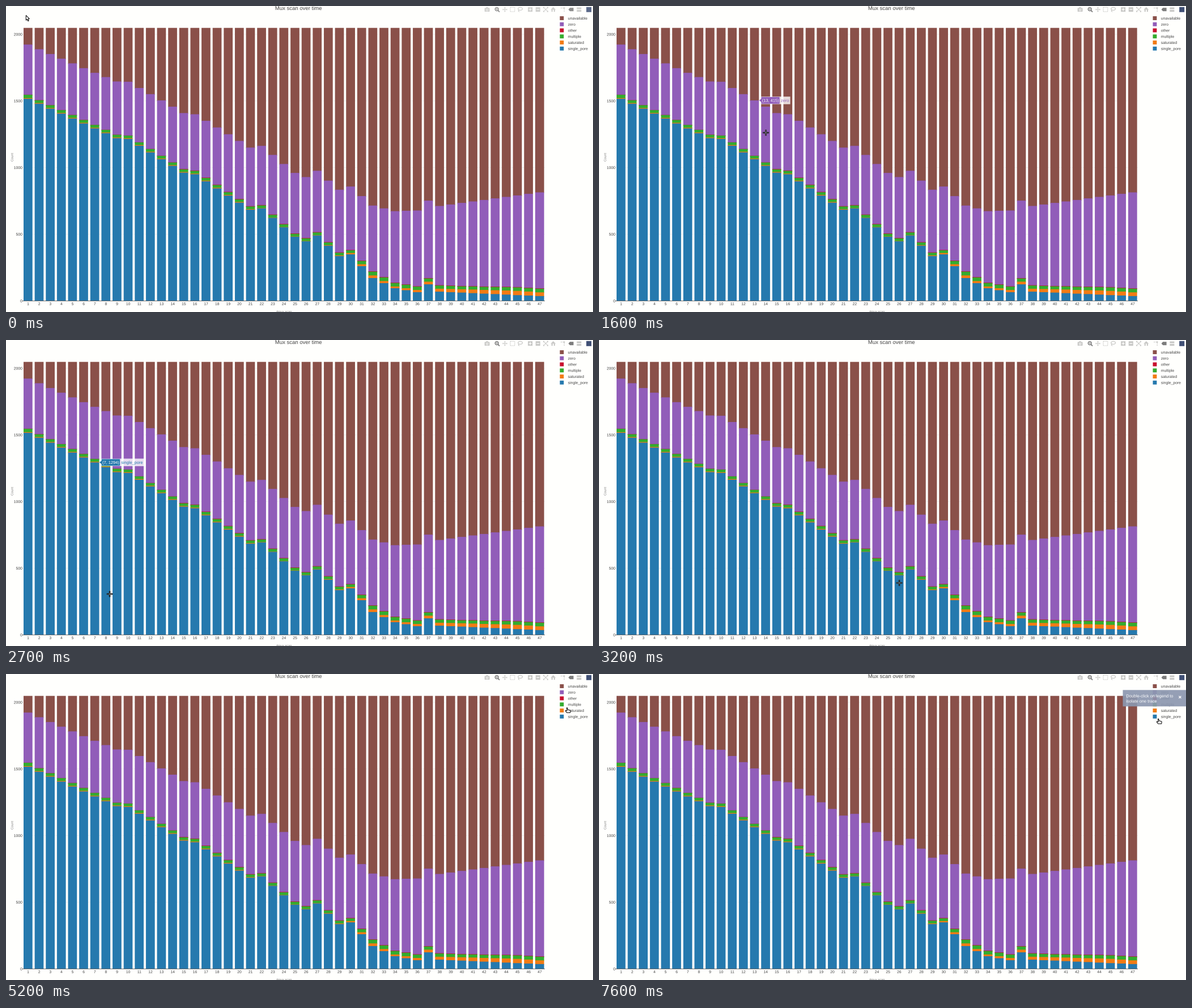
Animation, 1036 px wide and 541 px high, one loop 8 s. Source, as a matplotlib script:

```python
import numpy as np
import matplotlib.pyplot as plt
from matplotlib.animation import FuncAnimation
from matplotlib.collections import PolyCollection
from matplotlib.patches import Circle, Ellipse, PathPatch, Polygon, Rectangle
from matplotlib.path import Path
from matplotlib.textpath import TextPath

W, H, DPI = 1036, 541, 100
STEP, LOOP = 100, 8000
PX = 72 / DPI
INK, FAINT, ACTIVE, PAPER = "#444444", "#c8c8c6", "#7c7c7c", "#fffffd"
plt.rcParams["path.snap"] = False

NAMES = ["single_pore", "saturated", "multiple", "other", "zero", "unavailable"]
COLORS = ["#2579ae", "#f27b14", "#33ac2e", "#c8102e", "#915db9", "#8a5049"]
SINGLE, SATURATED, ZERO, UNAVAILABLE = 0, 1, 4, 5
TOTAL, N = 2048, 47
scan = np.arange(1, N + 1)


def trend(*points):
    """Counts per scan along straight lines between (scan, count) points."""
    return np.interp(scan, *zip(*points)).round()


single = trend((1, 1516), (6, 1331), (9, 1221), (10, 1215), (15, 962),
               (16, 950), (21, 684), (22, 694), (25, 481), (26, 447),
               (27, 491), (29, 336), (30, 349), (32, 171), (34, 95),
               (36, 65), (37, 124), (38, 69), (47, 36))
saturated = trend((1, 5), (20, 5), (22, 2), (27, 2), (29, 5), (32, 20),
                  (34, 13), (39, 24), (45, 32), (47, 28))
multiple = trend((1, 25), (2, 21), (13, 20), (30, 20), (32, 28), (40, 22),
                 (47, 27))
other = np.where(scan > 14, 3, 1)
rest = trend((1, 407), (7, 417), (13, 441), (28, 488), (30, 509), (36, 613),
             (47, 778))
zero = rest - saturated - multiple - other
counts = np.array([single, saturated, multiple, other, zero,
                   TOTAL - single - rest])

# Plot geometry in pixels
X1, PITCH, HALF = 38.85, 19.63, 7.85
BASE, TALLEST = 521.3, 482.6
center = X1 + PITCH * (scan - 1)

fig = plt.figure(figsize=(W / DPI, H / DPI), dpi=DPI, facecolor=PAPER)
ax = fig.add_axes([0, 0, 1, 1])
ax.set(xlim=(0, W), ylim=(H, 0))
ax.axis("off")


def patch(p, color, z=3, **kw):
    p.set(facecolor=color, edgecolor="none", zorder=z)
    p.set(**kw)
    return ax.add_patch(p)


def rect(x, y, w, h, color, z=3, **kw):
    return patch(Rectangle((x, y), w, h), color, z, **kw)


def line(xs, ys, color=FAINT, width=1.0, z=3, **kw):
    return ax.plot(xs, ys, color=color, lw=width * PX, zorder=z,
                   solid_capstyle="butt", **kw)[0]


def glyphs(s, size):
    return TextPath((0, 0), s, size=size, prop={"family": "Liberation Sans"})


def text_path(x, y, s, size=6.8, align=0, upright=False):
    """Outline of a text with capitals centred on y; align 0 left, 1 right."""
    p = glyphs(s, size)
    v = p.vertices - [align * p.get_extents().x1, 0.36 * size]
    v = -v[:, ::-1] if upright else v * [1, -1]
    return Path(v + [x, y], p.codes)


def text(x, y, s, size=6.8, color=INK, align=0, z=3, upright=False):
    return patch(PathPatch(text_path(x, y, s, size, align, upright)), color, z)


# Axes, titles and legend
text(516, 3.6, "Mux scan over time", 9.55, align=0.5)
text(490.5, 540.2, "#mux scan", 5.66, "#7f7f7f", 0.5)
text(10.6, 267.5, "Count", 5.66, "#7f7f7f", 0.5, upright=True)
for n, x in zip(scan, center):
    text(x, 526.4, str(n), align=0.5)
text(28.6, 521.4, "0", align=1)
line([29, 951], [BASE, BASE], INK, 0.8)
ticks = [(v, text(28.6, 0, str(v), align=1),
          line([29, 951], [0, 0], "#eeeeee", 0.7, z=0))
         for v in range(500, 2001, 500)]
bars = [ax.add_collection(PolyCollection([], facecolors=c, edgecolors="none",
                                         zorder=2 - 0.1 * k))
        for k, c in enumerate(COLORS)]
legend = []
for k, (name, c) in enumerate(zip(NAMES, COLORS)):
    y = 75.3 - 10.74 * k
    legend.append((rect(977.5, y - 3.5, 6.9, 6.9, c), text(991.8, y, name)))


def build_toolbar():
    """Row of small tool icons in the top right corner."""
    parts = [
        rect(844.7, 3.6, 8.8, 6.4, FAINT), rect(847, 2.3, 4, 2, FAINT),
        patch(Circle((849.1, 6.8), 2.1), PAPER),
        patch(Circle((849.1, 6.8), 1.2), FAINT),
        patch(Circle((866.2, 5.6), 2.9), "none", edgecolor=ACTIVE, lw=1.5 * PX),
        line([868.2, 871], [7.7, 10.6], ACTIVE, 1.8),
        line([864.8, 867.6], [5.6, 5.6], ACTIVE, 0.8),
        line([866.2, 866.2], [4.2, 7], ACTIVE, 0.8),
        line([877, 884], [6.2, 6.2]), line([880.5, 880.5], [2.7, 9.7]),
        patch(Rectangle((890, 2.4), 7.8, 7.6), "none", edgecolor=FAINT,
              lw=1.1 * PX, linestyle=(0, (1.4, 1))),
        patch(Ellipse((907.6, 5), 7.8, 5), "none", edgecolor=FAINT, lw=1.2 * PX),
        line([905, 904.3, 906], [7, 8.8, 10.4], width=1.2),
    ]
    for dx, dy in ((1, 0), (-1, 0), (0, 1), (0, -1)):
        tip = np.array([880.5 + 4.6 * dx, 6.2 + 4.6 * dy])
        back = tip - 1.9 * np.array([dx, dy])
        side = 1.5 * np.array([dy, dx])
        parts.append(patch(Polygon([tip, back + side, back - side]), FAINT))
    for x in (925.2, 938.8):
        parts += [rect(x - 4, 2.2, 8, 8, FAINT),
                  line([x - 2.5, x + 2.5], [6.2, 6.2], PAPER, 1.3)]
    parts.append(line([925.2, 925.2], [3.7, 8.7], PAPER, 1.3))
    parts += [line([948.5, 956.5], [2.2, 10.2]), line([948.5, 956.5], [10.2, 2.2])]
    for sx in (-1, 1):
        for sy in (-1, 1):
            x, y = 952.5 + 4.4 * sx, 6.2 + 4.4 * sy
            parts.append(patch(Polygon([(x, y), (x - 2.6 * sx, y),
                                        (x, y - 2.6 * sy)]), FAINT))
    dashes = (0, (2, 1))
    parts += [
        patch(Polygon([(961.3, 6.5), (965.8, 2), (970.3, 6.5)]), FAINT),
        rect(962.6, 6.4, 2.2, 3.8, FAINT), rect(966.8, 6.4, 2.2, 3.8, FAINT),
        line([979, 986], [3.6, 3.6], width=1.1, linestyle=dashes),
        line([985.2, 985.2], [4.6, 10.5], width=1.1, linestyle=dashes),
        patch(Circle((985.2, 3.6), 1.3), FAINT),
        patch(Polygon([(992.6, 6.2), (995.2, 3.2), (1001.6, 3.2),
                       (1001.6, 9.2), (995.2, 9.2)]), ACTIVE),
        rect(1007.4, 2.5, 8, 3.2, FAINT), rect(1007.4, 7, 8, 3.2, FAINT),
        rect(1024.2, 1.8, 9, 9, "#3f4f75"),
    ]
    return parts


toolbar = build_toolbar()

# Hover label
HOVER = 7.4
name_box = rect(0, 0, 1, 13.4, "white", z=5, alpha=0.8)
value_box = patch(Polygon(np.zeros((7, 2))), "k", 6, edgecolor="white", lw=0.4)
value_text = text(0, 0, "0", HOVER, "white", z=7)
name_text = text(0, 0, "0", HOVER, z=7)
hover = [name_box, value_box, value_text, name_text]

# Notification
note = [rect(924.5, 28.3, 111.5, 29, "#8c97af", z=8),
        text(930.3, 38.7, "Double-click on legend to", HOVER, "white", z=9),
        text(930.3, 47.8, "isolate one trace", HOVER, "white", z=9),
        line([1023.4, 1027.4], [38.9, 42.9], "white", 1.3, z=9),
        line([1023.4, 1027.4], [42.9, 38.9], "white", 1.3, z=9)]

# Pointer shapes, relative to the pointer position
A, T = 4.8, 0.7
SHAPES = {
    "cross": [(-T, -A), (T, -A), (T, -T), (A, -T), (A, T), (T, T), (T, A),
              (-T, A), (-T, T), (-A, T), (-A, -T), (-T, -T)],
    "arrow": [(-0.7, -0.5), (-0.7, 8.2), (1.3, 6.4), (2.8, 9.7), (4.2, 9.1),
              (2.8, 5.9), (5.4, 5.7)],
    "hand": [(-1.7, -4.2), (-0.6, -4.4), (0.4, -0.9), (4.4, 0.2), (5, 1.2),
             (4.5, 4.4), (-1.4, 4.4), (-4, 1.1), (-3.3, 0.2), (-1, 1.2)],
}
pointers = {k: patch(Polygon(v), "white", 10, edgecolor="#161616", lw=0.8)
            for k, v in SHAPES.items()}

# Pointer stops: time, x, y
STOPS = [(0, 36, 17), (600, 36, 17), (1000, 295, 138), (1300, 306, 164),
         (1600, 294.5, 224), (1700, 294.5, 224), (2300, 64.5, 440),
         (2600, 167, 450), (3560, 698, 420), (4200, 888, 142),
         (4500, 888, 142), (4900, 990, 83), (5200, 991.2, 64),
         (7300, 991.2, 64), (7600, 988.2, 83.6), (LOOP, 988.2, 83.6)]

# Hover labels: from, until, scan, trace
LABELS = [(1000, 1200, 14, UNAVAILABLE), (1200, 1600, 15, UNAVAILABLE),
          (1600, 1800, 13, ZERO), (2100, 2500, 3, SINGLE),
          (2600, 2800, 7, SINGLE), (3400, 3700, 35, ZERO),
          (4100, 4700, 45, UNAVAILABLE)]


def pointer_at(t):
    """Ease in and out between neighbouring stops."""
    for (t0, *a), (t1, *b) in zip(STOPS, STOPS[1:]):
        if t <= t1:
            u = (t - t0) / (t1 - t0)
            return np.array(a) + np.subtract(b, a) * u * u * (3 - 2 * u)


def draw_bars(hidden):
    shown = counts.copy()
    if hidden:
        shown[SATURATED] = 0
    tops = shown.cumsum(axis=0)
    scale = TALLEST / tops[-1].max()
    left, right = center - HALF, center + HALF
    low = np.full(N, BASE)
    for coll, top in zip(bars, BASE - scale * tops):
        coll.set_verts(np.stack([np.column_stack(p) for p in (
            (left, low), (left, top), (right, top), (right, low))], axis=1))
        low = np.minimum(top + 1, BASE)  # overlap hides seams
    for v, label, grid in ticks:
        y = BASE - scale * v
        label.set_path(text_path(28.6, y, str(v), align=1))
        grid.set_ydata([y, y])
    for artist in legend[SATURATED]:
        artist.set_alpha(0.5 if hidden else 1)


def draw_hover(t):
    label = next((l for l in LABELS if l[0] <= t < l[1]), None)
    for artist in hover:
        artist.set_visible(label is not None)
    if label is None:
        return
    n, k = label[2:]
    x = center[n - 1] + HALF
    y = BASE - TALLEST / TOTAL * counts[:k + 1, n - 1].sum()
    value = f"({n}, {int(counts[k, n - 1])})"
    left, start = x + 3.8, x + 5.6
    right = start + glyphs(value, HOVER).get_extents().x1 + 2
    value_box.set_xy([(x, y), (left, y - 3), (left, y - 6.2), (right, y - 6.2),
                      (right, y + 6.2), (left, y + 6.2), (left, y + 3)])
    value_box.set_facecolor(COLORS[k])
    value_text.set_path(text_path(start, y, value, HOVER))
    name_text.set_path(text_path(right + 2, y, NAMES[k], HOVER))
    name_text.set_facecolor(COLORS[k])
    name_box.set(x=right, y=y - 6.7,
                 width=glyphs(NAMES[k], HOVER).get_extents().x1 + 4.4)


def draw_pointer(t):
    pos = pointer_at(t)
    if t < 100 or 951 < pos[0] < 975:
        kind = "arrow"
    else:
        kind = "hand" if pos[0] >= 975 else "cross"
    for k, p in pointers.items():
        p.set_visible(k == kind)
    pointers[kind].set_xy(np.array(SHAPES[kind]) + pos)


def update(i):
    t = i * STEP
    draw_bars(6100 <= t < 7100)
    draw_hover(t)
    draw_pointer(t)
    for artist in toolbar:
        artist.set_alpha(min(1, 0.86 + 0.07 * i))
    shade = np.clip((t - 6000) / 600, 0, 1)
    for artist in note:
        artist.set_alpha(shade * (0.92 if artist is note[0] else 1))
    return []


anim = FuncAnimation(fig, update, frames=LOOP // STEP, interval=STEP,
                     init_func=lambda: update(0), repeat=True, repeat_delay=0)
plt.show()
```
